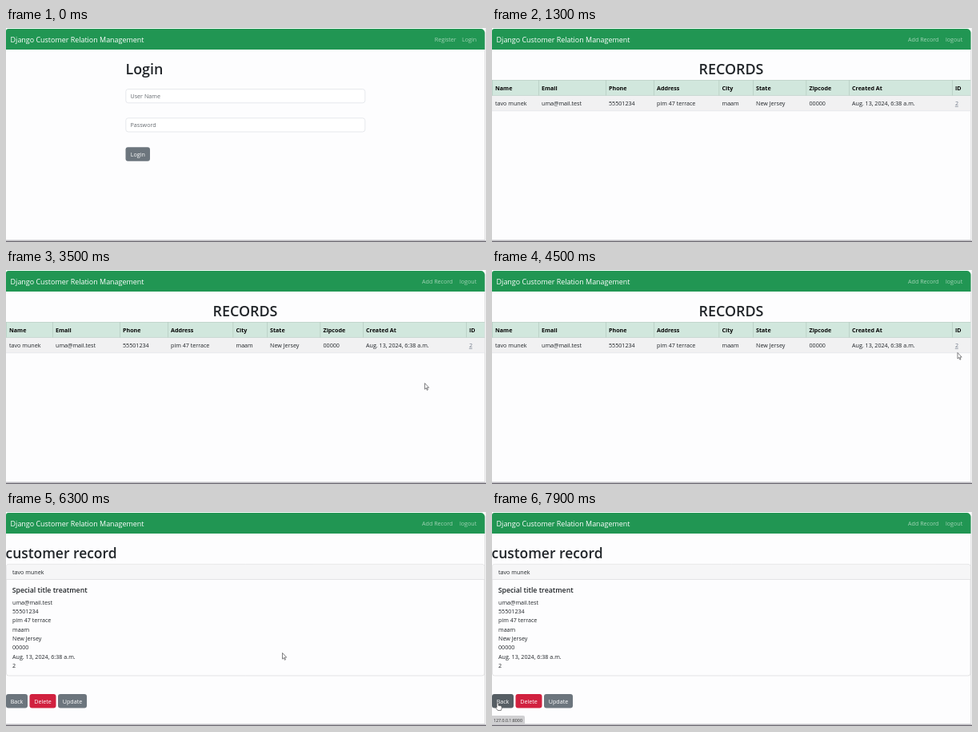
Write an HTML page with a canvas that moves like this. It is 600 px wide and 268 px high and loops after 8000 ms.

```html
<!DOCTYPE html>
<html lang="en">
<head>
<meta charset="utf-8">
<title>Customer records</title>
<style>
html, body { margin: 0; width: 100%; height: 100%; overflow: hidden; background: #fdfdfe; }
canvas { display: block; width: 600px; height: 268px; }
</style>
</head>
<body>
<canvas id="stage"></canvas>
<script>
const LOOP = 8000;
const FONT = '"Open Sans", "Noto Sans", sans-serif';
const INK = '#212529', GREY = '#6c757d', RED = '#d1213f';
const canvas = document.getElementById('stage');
const ctx = canvas.getContext('2d');
const dpr = window.devicePixelRatio || 1;
canvas.width = 600 * dpr;
canvas.height = 268 * dpr;

const customer = {
  name: 'tavo munek', email: 'uma@mail.test', phone: '55501234',
  address: 'pim 47 terrace', city: 'maam', state: 'New Jersey',
  zip: '00000', created: 'Aug. 13, 2024, 6:38 a.m.', id: '2'
};
const titles = ['Name', 'Email', 'Phone', 'Address', 'City', 'State', 'Zipcode', 'Created At', 'ID'];
const edges = [0, 58, 142, 202, 283.5, 326, 392.5, 446, 575];

// Pointer stops: time, x, y of the tip
const path = [
  [2100, 398, 195], [2600, 411.5, 170.5], [3000, 440, 202], [3600, 530, 137],
  [4300, 582, 103.5], [4600, 582, 103.5], [4800, 580.5, 93.5], [5800, 580.5, 93.5],
  [6200, 345.5, 176.5], [6400, 345.5, 176.5], [7000, 7, 238.5], [8000, 7, 238.5]
];

function rect(x, y, w, h, fill) {
  ctx.fillStyle = fill;
  ctx.fillRect(x, y, w, h);
}

function box(x, y, w, h, r, fill, stroke) {
  ctx.beginPath();
  ctx.roundRect(x, y, w, h, r);
  if (fill) { ctx.fillStyle = fill; ctx.fill(); }
  if (stroke) { ctx.strokeStyle = stroke; ctx.lineWidth = 0.8; ctx.stroke(); }
}

function text(str, x, y, { size = 7.15, weight = 400, color = INK, align = 'left' } = {}) {
  ctx.font = `${weight} ${size}px ${FONT}`;
  ctx.fillStyle = color;
  ctx.textAlign = align;
  ctx.fillText(str, x, y);
}

function button(label, x, y, w, fill) {
  box(x, y, w, 17.5, 3, fill);
  text(label, x + w / 2, y + 11.6, { color: '#fff', align: 'center' });
}

function frame(links) {
  rect(0, 0, 600, 268, '#f1f1f2');
  rect(0, 0, 598.5, 265.5, '#fdfdfe');
  rect(598.3, 5, 0.7, 260, '#d8d8da');
  rect(0, 265, 599, 1, '#d5d5d8');
  rect(0, 266.6, 600, 1.4, '#6b6870');
  box(0, 1, 598.5, 26, [3, 5, 0, 0], '#219653');
  text('Django Customer Relation Management', 5.6, 17.6, { size: 8.95, color: '#fff' });
  for (const [label, x] of links) text(label, x, 17.3, { color: '#a1d3b5' });
}

function loginPage() {
  frame([['Register', 535.8], ['Login', 570]]);
  text('Login', 149.5, 57.5, { size: 17.9, weight: 600 });
  [['User Name', 76.6], ['Password', 112.8]].forEach(([label, y]) => {
    box(149.8, y, 299, 17.2, 3, '#fff', '#e0e3e7');
    text(label, 155.5, y + 11.3, { color: '#666b70' });
  });
  button('Login', 149.5, 149.2, 30.5, GREY);
}

const memberLinks = [['Add Record', 520], ['logout', 567]];

function recordsPage(hover) {
  frame(memberLinks);
  text('RECORDS', 299, 57.5, { size: 17.9, weight: 600, align: 'center' });
  rect(0, 65, 598.3, 19.5, '#d1e7dd');
  rect(0, 84.5, 598.3, 19.5, hover ? '#eaeaeb' : '#f1f1f2');
  rect(0, 65, 598.3, 0.7, '#bcd0c7');
  rect(0, 84, 598.3, 0.7, '#bcd0c7');
  rect(0, 103.6, 598.3, 0.6, '#dee2e6');
  const values = Object.values(customer);
  edges.forEach((x, i) => {
    rect(x, 65, 0.7, 19.5, '#b5cbc0');
    text(titles[i], x + 4, 77.6, { weight: 700, color: '#050505' });
    text(values[i], x + 4, 97, { color: i === 8 ? '#6c7686' : INK });
  });
  rect(578.8, 98, 4, 0.6, '#6c7686');
  if (hover) status('127.0.0.1:8000/record/2', 65);
}

function detailPage(hover) {
  frame(memberLinks);
  text('customer record', -0.5, 57.5, { size: 17.45, weight: 600 });
  box(0.4, 65.4, 597.6, 139.6, 3, '#fdfdfe', '#dcdcde');
  box(0.8, 65.8, 596.8, 18.6, [3, 3, 0, 0], '#f6f6f7');
  rect(0, 84.2, 598, 0.7, '#dcdcde');
  text(customer.name, 8, 77.6);
  text('Special title treatment', 7.7, 101.2, { size: 8.76, weight: 600 });
  Object.values(customer).slice(1).forEach((v, i) => text(v, 8, 115.8 + i * 11.3));
  button('Back', 0, 228, 27, hover ? '#565e64' : GREY);
  button('Delete', 29.5, 228, 33, RED);
  button('Update', 65, 228, 36, GREY);
  if (hover) status('127.0.0.1:8000', 41);
}

function status(label, w) {
  box(-1, 255, w + 1, 11, [0, 2, 0, 0], '#d0d0d2');
  text(label, 2, 262.6, { size: 5.3, color: '#333' });
}

function pointerAt(t) {
  if (t < path[0][0]) return null;
  const i = path.findIndex(p => p[0] > t);
  const [t0, x0, y0] = path[i - 1], [t1, x1, y1] = path[i];
  const k = (t - t0) / (t1 - t0), e = k * k * (3 - 2 * k);
  return [x0 + (x1 - x0) * e, y0 + (y1 - y0) * e];
}

function outline(d, x, y) {
  ctx.save();
  ctx.translate(x, y);
  const shape = new Path2D(d);
  ctx.fillStyle = '#fff';
  ctx.strokeStyle = '#4c4c50';
  ctx.lineWidth = 0.7;
  ctx.lineJoin = 'round';
  ctx.fill(shape);
  ctx.stroke(shape);
  ctx.restore();
}

const ARROW = 'M0 0V7.6L1.7 6 2.9 8.8 4 8.3 2.8 5.6H5.2Z';
const HAND = 'M-1 1Q0-.6 1 1V4Q2 3.4 2.6 4.2 3.4 3.6 4 4.5 5.2 4.1 5.2 5.6V7.4L4.3 10H.2L-2.3 6.7Q-2.2 5.4-1 6.4Z';

function draw(t) {
  ctx.setTransform(dpr, 0, 0, dpr, 0, 0);
  const onLink = t >= 4750 && t < 5850;
  const onBack = t >= 6960;
  if (t < 1000) loginPage();
  else if (t < 5850) recordsPage(onLink);
  else detailPage(onBack);
  const p = pointerAt(t);
  if (p) outline(onLink || onBack ? HAND : ARROW, ...p);
}

const start = performance.now();
function tick() {
  draw((performance.now() - start) % LOOP);
  requestAnimationFrame(tick);
}
tick();
</script>
</body>
</html>
```
